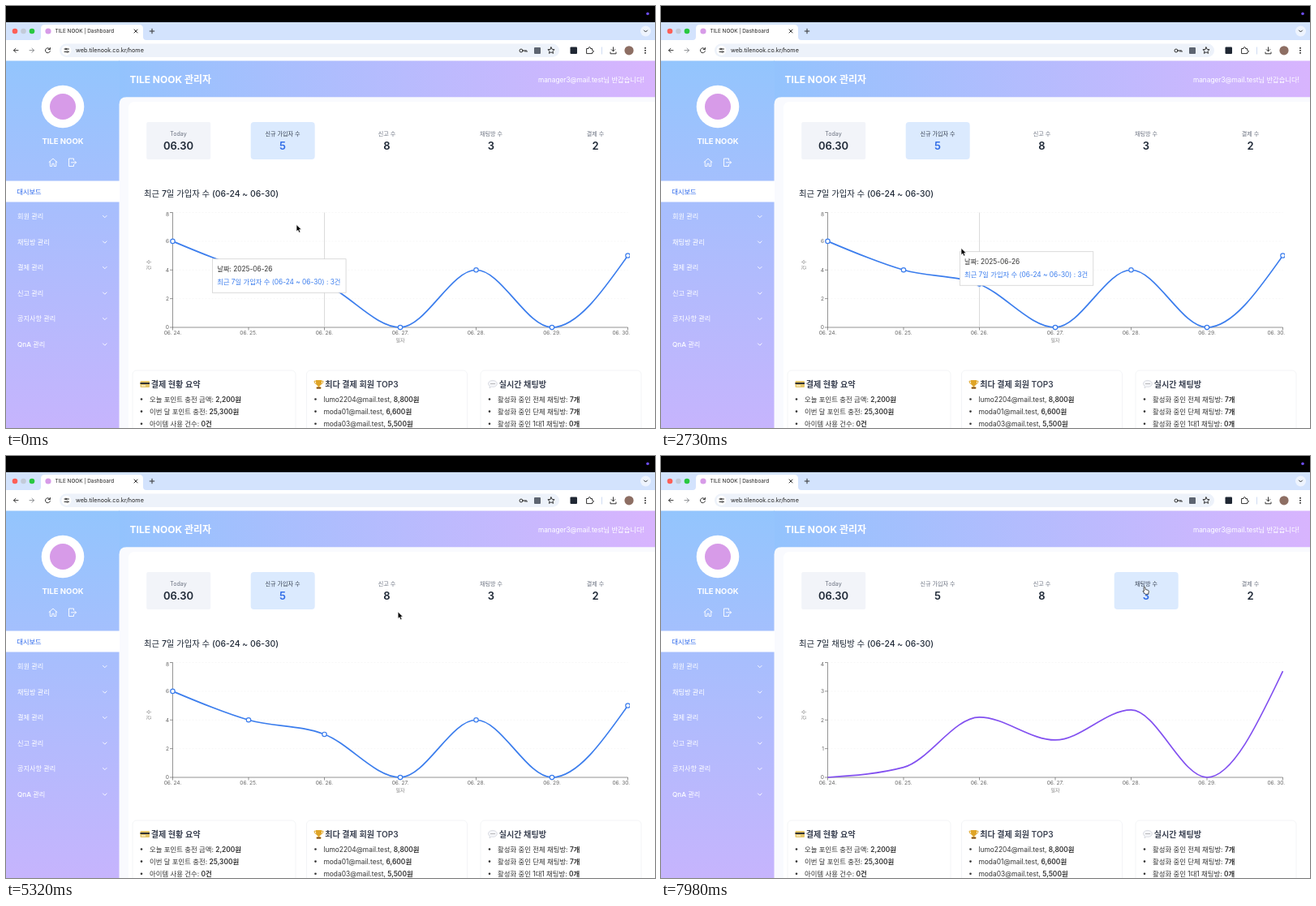
An HTML page for the animation above (8000 ms loop, 800 px wide and 520 px high).

```html
<!DOCTYPE html>
<html lang="ko">
<head>
<meta charset="utf-8">
<title>Dashboard</title>
<style>
  html, body { margin: 0; width: 100%; height: 100%; overflow: hidden; background: #fff; }
  svg { display: block; width: 100vw; height: 100vh; }
  text { font-family: Inter, 'Noto Sans CJK KR', 'Noto Sans CJK', 'Noto Sans', sans-serif; white-space: pre; }
  .icon { fill: none; stroke: #333; stroke-width: 1; stroke-linecap: round; stroke-linejoin: round; }
  .white { stroke: #fff; stroke-width: .9; }
  .dim { stroke: #8a8d91; }
</style>
</head>
<body>
<svg id="stage" viewBox="0 0 800 520">
  <defs>
    <linearGradient id="side" x2="0" y2="1"><stop stop-color="#93c5fd"/><stop offset="1" stop-color="#c6b4fd"/></linearGradient>
    <linearGradient id="head"><stop stop-color="#93c3fd"/><stop offset="1" stop-color="#d8b4fe"/></linearGradient>
    <clipPath id="plot"><rect x="170" y="240" width="599" height="175"/></clipPath>
  </defs>

  <g id="browser">
    <rect width="800" height="20"/>
    <circle cx="791" cy="9.5" r="1.8" fill="#6d4df2"/>
    <rect y="20" width="800" height="22" fill="#d3e3fd"/>
    <circle cx="11" cy="31" r="3.3" fill="#ff5f57"/>
    <circle cx="21.5" cy="31" r="3.3" fill="#c3cbd9"/>
    <circle cx="32" cy="31" r="3.3" fill="#28c840"/>
    <path d="M39 42q4 0 4-4V28q0-5 5-5H164q5 0 5 5v10q0 4 4 4z" fill="#fff"/>
    <circle cx="52" cy="31" r="3.6" fill="#d79be8"/>
    <path class="icon" d="M158 29l4 4m0-4l-4 4M177.200 31h5.600m-2.800-2.800v5.600"/>
    <circle cx="788.500" cy="31" r="6.500" fill="#eef4fe"/>
    <path class="icon" d="M786.500 30l2 2 2-2"/>
    <rect y="42" width="800" height="25.500" fill="#fff"/>
    <rect x="66" y="46.500" width="616" height="16.500" rx="8.200" fill="#edf2fa"/>
    <circle cx="74.500" cy="54.700" r="6" fill="#fff"/>
    <path class="icon" d="M15 54.700H9.500m2.500-2.500l-2.500 2.500 2.500 2.500"/>
    <path class="icon dim" d="M29 54.700h5.500m-2.500-2.500l2.500 2.500-2.500 2.500"/>
    <path class="icon" d="M54.200 53.400a3 3 0 1 0 .2 2.200M54.400 51.400v2.200h-2.200"/>
    <path class="icon" d="M72 53h1m2.500 0h2M72 56.500h2m2.500 0h1"/>
    <circle class="icon" cx="74" cy="53" r=".9"/><circle class="icon" cx="75.500" cy="56.500" r=".9"/>
    <circle class="icon" cx="635" cy="55" r="2"/><path class="icon" d="M637 55h5v1.500m-2-1.500v1.300"/>
    <rect x="651" y="51" width="8" height="8" rx="1" fill="#5d6470"/>
    <path class="icon" d="M672 50.800l1.200 2.600 2.900.3-2.200 1.900.7 2.800-2.600-1.500-2.600 1.500.7-2.800-2.200-1.900 2.900-.3z"/>
    <rect x="695.500" y="50.500" width="8.500" height="8.500" rx="1" fill="#1f2733"/>
    <path class="icon" d="M716 52.500h2q0-2 1.300-2t1.300 2h2v2.200q1.800 0 1.800 1.200t-1.800 1.200v1.500h-6.600z"/>
    <path d="M734.500 50.500v9" stroke="#cfdcf3"/>
    <path class="icon" d="M748.500 50.800v5m-2.300-2.200l2.300 2.300 2.300-2.300M745 57v1.800h7V57"/>
    <circle cx="768" cy="54.800" r="5.600" fill="#8d6e63"/>
    <circle cx="788" cy="51.800" r=".9"/><circle cx="788" cy="54.800" r=".9"/><circle cx="788" cy="57.800" r=".9"/>
  </g>

  <g id="frame">
    <rect x="139" y="67.500" width="661" height="60" fill="url(#head)"/>
    <rect y="67.500" width="140" height="453" fill="url(#side)"/>
    <path d="M139.500 520V121.300q0-9 9-9H800V520z" fill="#f9fafe"/>
    <path d="M151 520V126q0-8 8-8H800v402z" fill="#fff"/>
    <circle cx="70" cy="124" r="26.300" fill="#fff"/>
    <circle cx="70" cy="124" r="16" fill="#d79be8"/>
    <path class="icon white" d="M53 192.500l5-4.500 5 4.500m-8.700-1v6h2.500v-3.200h2.400v3.200h2.500v-6"/>
    <path class="icon white" d="M83.500 190v-2h-6v9.500h6v-2M80.500 192.800h6m-1.800-1.800l1.800 1.800-1.800 1.800"/>
    <rect y="215.500" width="140" height="26" fill="#fff"/>
  </g>

  <g id="labels"></g>
  <g id="emoji">
    <rect x="165.500" y="462" width="11.500" height="8" rx="1" fill="#e5c66a"/>
    <path d="M165.500 464h11.500v2h-11.500z" fill="#333"/><path d="M167 467.500h5v1h-5z" fill="#fff"/>
    <path d="M382 461h7v3q0 3.500-2.500 4v1.500h2v2h-6v-2h2V468q-2.500-.5-2.500-4z" fill="#e0a526"/>
    <path d="M382 462.200h-2q0 3.300 2.600 3.500M389 462.200h2q0 3.300-2.600 3.500" fill="none" stroke="#e0a526"/>
    <path d="M383 469.800h5v1.700h-5z" fill="#7a4a22"/>
    <path d="M594.500 465.300c0-5.200 10.800-5.200 10.800 0 0 3.800-4.500 4.500-6.600 3.800l-2.700 1.700.3-2.600q-1.800-1-1.800-2.900z" fill="#f4f5f8" stroke="#c5c8d2" stroke-width=".6"/>
    <path d="M597.500 465.500h5" stroke="#777" stroke-width="1" stroke-dasharray="1 1"/>
  </g>
  <g id="cards"></g>
  <g id="chart"></g>
  <path id="arrow" d="M0 0v8.300l1.900-1.700 1.300 3 1.600-.7-1.300-2.900h2.600z" fill="#000" stroke="#fff" stroke-width=".6"/>
  <path id="hand" d="M0 .8q.9-1.300 1.800 0l.5 2.800 3 .7q1.100.4 1 1.600l-.5 3.400H1.900L-.9 6q-.2-1.300 1.500-.6z" fill="#fff" stroke="#222" stroke-width=".8"/>
</svg>

<script>
const LOOP = 8000;
const byId = id => document.getElementById(id);
const BRAND = 'TILE NOOK';

function text(x, y, size, content, fill = '#333', weight = 400, anchor = 'start', extra = '') {
  return `<text x="${x}" y="${y}" font-size="${size}" fill="${fill}" font-weight="${weight}" text-anchor="${anchor}" ${extra}>${content}</text>`;
}
const line = (x1, y1, x2, y2, stroke, extra = '') =>
  `<path d="M${x1} ${y1}L${x2} ${y2}" stroke="${stroke}" stroke-width=".7" ${extra}/>`;

// Static labels
const menu = ['회원 관리', '채팅방 관리', '결제 관리', '신고 관리', '공지사항 관리', 'QnA 관리'];
const panels = [
  [156, 201, '결제 현황 요약', [['오늘 포인트 충전 금액: ', '2,200원'], ['이번 달 포인트 충전: ', '25,300원'], ['아이템 사용 건수: ', '0건']]],
  [370.5, 198, '최다 결제 회원 TOP3', [['lumo2204@mail.test, ', '8,800원'], ['moda01@mail.test, ', '6,600원'], ['moda03@mail.test, ', '5,500원']]],
  [585, 198, '실시간 채팅방', [['활성화 중인 전체 채팅방: ', '7개'], ['활성화 중인 단체 채팅방: ', '7개'], ['활성화 중인 1대1 채팅방: ', '0개']]],
];
byId('labels').innerHTML =
  text(60.5, 33.4, 6.4, BRAND + ' | Dashboard', '#222') +
  text(86, 57.4, 7.2, 'web.tilenook.co.kr/home', '#222') +
  text(152.5, 94.7, 12, BRAND + ' 관리자', '#fff', 700) +
  text(787, 93.5, 8.3, 'manager3@mail.test님 반갑습니다!', '#fff', 400, 'end') +
  text(70, 170, 9.5, BRAND, '#fff', 700, 'middle') +
  text(13.5, 231.5, 8.2, '대시보드', '#2563eb', 500) +
  menu.map((name, i) => {
    const y = 259.4 + 31.5 * i;
    return text(14, y + 3, 8.2, name, '#fff', 500) +
      `<path class="icon white" d="M119.500 ${y - 1}l2.300 2.300 2.300-2.300"/>`;
  }).join('') +
  panels.map(([x, width, title, rows]) =>
    `<rect x="${x}" y="449" width="${width}" height="90" rx="5" fill="#fff" stroke="#f0f1f4" stroke-width=".8"/>` +
    text(x + 22.7, 469.7, 10.1, title, '#3b4252', 600) +
    rows.map(([label, value], i) => {
      const y = 487.5 + 15.1 * i;
      return `<circle cx="${x + 11}" cy="${y - 3}" r="1.300" fill="#333"/>` +
        text(x + 21, y, 8.4, `${label}<tspan font-weight="600">${value}</tspan>`);
    }).join('')).join('');

// Chart data; each series starts at its click time
const series = [
  { start: -9000, name: '가입자', max: 8, color: '#3b7ded', values: [6, 4, 3, 0, 4, 0, 5] },
  { start: 5657, name: '신고', max: 8, color: '#f59e0b', values: [0, 1, 6, 2, 5, 0, 8] },
  { start: 7677, name: '채팅방', max: 4, color: '#8250f0', values: [0, 0, 0, 2, 2, 0, 3] },
];
const cards = [['Today', '06.30'], ['신규 가입자 수', 5], ['신고 수', 8], ['채팅방 수', 3], ['결제 수', 2]];
const STEP = 93.5, LEFT = 205.5, TOP = 254.5, BOTTOM = 396;
const tickX = i => LEFT + STEP * i;
const levelY = f => BOTTOM - f * (BOTTOM - TOP);

// CSS "ease" timing curve
function ease(x) {
  if (x >= 1) return 1;
  let lo = 0, hi = 1;
  for (let i = 0; i < 24; i++) {
    const u = (lo + hi) / 2;
    if (.75 * u * (1 - u) + u ** 3 < x) lo = u; else hi = u;
  }
  return .3 * lo * (1 - lo) ** 2 + 3 * lo * lo * (1 - lo) + lo ** 3;
}

// Monotone cubic path through evenly spaced points
function curve(ys) {
  const s = ys.slice(1).map((y, i) => y - ys[i]);
  const m = ys.map((_, i) => i && i < s.length
    ? (Math.sign(s[i - 1]) + Math.sign(s[i])) * Math.min(Math.abs(s[i - 1]), Math.abs(s[i]), Math.abs(s[i - 1] + s[i]) / 4)
    : 0);
  const n = s.length;
  m[0] = (3 * s[0] - m[1]) / 2;
  m[n] = (3 * s[n - 1] - m[n - 1]) / 2;
  return `M${LEFT} ${ys[0]}` + s.map((_, i) =>
    `C${tickX(i + 1 / 3)} ${ys[i] + m[i] / 3} ${tickX(i + 2 / 3)} ${ys[i + 1] - m[i + 1] / 3} ${tickX(i + 1)} ${ys[i + 1]}`).join('');
}

// Pointer path: time, x, y
const pointer = [
  [-400, 225, 315], [-80, 240, 314], [-55, 350, 282], [0, 358, 269.5], [450, 385, 288], [1100, 378, 292],
  [1650, 360, 270], [1800, 312, 268], [2100, 315, 284.5], [2500, 342, 296], [3060, 410, 302], [3240, 432, 317],
  [3360, 503.5, 328], [3900, 520, 325], [4060, 527, 316], [4270, 566, 305.5], [4550, 580, 298],
  [4950, 545, 258], [5400, 470, 178], [6160, 470, 176.5], [6650, 474, 176], [7050, 575, 162], [7210, 592.5, 159.5], [8000, 595, 161],
];
function pointerAt(t) {
  const k = Math.max(1, pointer.findIndex(p => p[0] >= t));
  const [t0, x0, y0] = pointer[k - 1], [t1, x1, y1] = pointer[k];
  const f = (t - t0) / (t1 - t0);
  return [x0 + (x1 - x0) * f, y0 + (y1 - y0) * f];
}
const activeTick = x => Math.max(0, Math.min(6, Math.round((x - LEFT) / STEP)));

// The tooltip trails its target by averaging the last 300 ms
function tooltipAt(t) {
  const count = 60;
  let x = 0, y = 0;
  for (let i = 0; i < count; i++) {
    const [px, py] = pointerAt(t - (i + .5) * 300 / count);
    x += tickX(activeTick(px)) + 7;
    y += py + 6;
  }
  return [x / count, y / count];
}

function drawCards(mode) {
  return cards.map(([label, value], i) => {
    const x = 212.5 + 128.5 * i, active = i === mode + 1;
    const fill = active ? '#dbeafe' : i ? '#fff' : '#f2f4f9';
    return `<rect x="${x - 39.3}" y="143" width="79" height="46" rx="${i ? 4 : 2}" fill="${fill}"/>` +
      text(x, 159.8, 7.1, label, active ? '#374151' : '#6b7280', 400, 'middle') +
      text(x, 176.5, 13, value, active ? '#2f6be6' : '#1f2937', 600, 'middle');
  }).join('');
}

function drawAxes(max) {
  let out = '';
  const ticks = max === 8 ? [0, 2, 4, 6, 8] : [0, 1, 2, 3, 4];
  for (const v of ticks) {
    const y = levelY(v / max);
    if (v) out += line(LEFT, y, 766.5, y, '#f4f4f4', 'stroke-dasharray="2 2"');
    out += line(LEFT - 3.5, y, LEFT, y, '#666') +
      text(201, (v === max ? 257 : y) + 2.4, 6.6, v, '#666', 400, 'end');
  }
  for (let i = 0; i < 7; i++) {
    const x = tickX(i);
    out += line(x, BOTTOM, x, BOTTOM + 3.5, '#666') +
      text(i === 6 ? 758.3 : x, 404.8, 6.6, `06. ${24 + i}.`, '#666', 400, 'middle');
  }
  return out + line(LEFT, TOP, LEFT, BOTTOM, '#666') + line(LEFT, BOTTOM, 766.5, BOTTOM, '#666') +
    text(486, 413.8, 6, '일자', '#808080', 400, 'middle') +
    text(0, 0, 6.2, '건 수', '#808080', 400, 'middle', 'transform="translate(178 319) rotate(-90)"');
}

function drawChart(t, mode, px, py) {
  const { start, name, max, color, values } = series[mode];
  const before = series[Math.max(0, mode - 1)];
  const p = ease((t - start) / 1500);
  const ys = values.map((v, i) => levelY(v / max * p + before.values[i] / before.max * (1 - p)));
  const title = `최근 7일 ${name} 수 (06-24 ~ 06-30)`;
  const hover = mode === 0 && py > TOP && py < BOTTOM;
  const tick = activeTick(px);
  let out = text(170, 235, 10.4, title, '#1f2937', 500) + drawAxes(max);
  if (hover) out += line(tickX(tick), TOP, tickX(tick), BOTTOM, '#ccc');
  out += `<g clip-path="url(#plot)"><path d="${curve(ys)}" fill="none" stroke="${color}" stroke-width="1.700"/>`;
  if (t - start > 1590) {
    out += ys.map((y, i) => hover && i === tick
      ? `<circle cx="${tickX(i)}" cy="${y}" r="3.400" fill="${color}" stroke="#fff" stroke-width=".8"/>`
      : `<circle cx="${tickX(i)}" cy="${y}" r="2.700" fill="#fff" stroke="${color}" stroke-width="1.200"/>`).join('');
  }
  out += '</g>';
  if (hover) {
    const [x, y] = tooltipAt(t);
    out += `<g transform="translate(${x} ${y})"><rect width="164.500" height="41.500" fill="#fff" stroke="#ccc" stroke-width=".7"/>` +
      text(5.7, 15.6, 8.3, `날짜: 2025-06-${24 + tick}`) +
      text(5.7, 30.8, 8.3, `${title} : ${values[tick]}건`, color) + '</g>';
  }
  return out;
}

let shownMode = -1;
function render(now) {
  const t = now % LOOP;
  const mode = series.filter(s => t >= s.start).length - 1;
  const [px, py] = pointerAt(t);
  if (mode !== shownMode) byId('cards').innerHTML = drawCards(mode);
  shownMode = mode;
  byId('chart').innerHTML = drawChart(t, mode, px, py);
  const overCard = py < 189 && cards.some((_, i) => i && Math.abs(px - 212.5 - 128.5 * i) < 39.5);
  for (const [id, visible] of [['hand', overCard], ['arrow', !overCard]]) {
    byId(id).setAttribute('transform', `translate(${px} ${py})`);
    byId(id).style.display = visible ? '' : 'none';
  }
  requestAnimationFrame(() => render(performance.now()));
}
render(performance.now());
</script>
</body>
</html>
```
